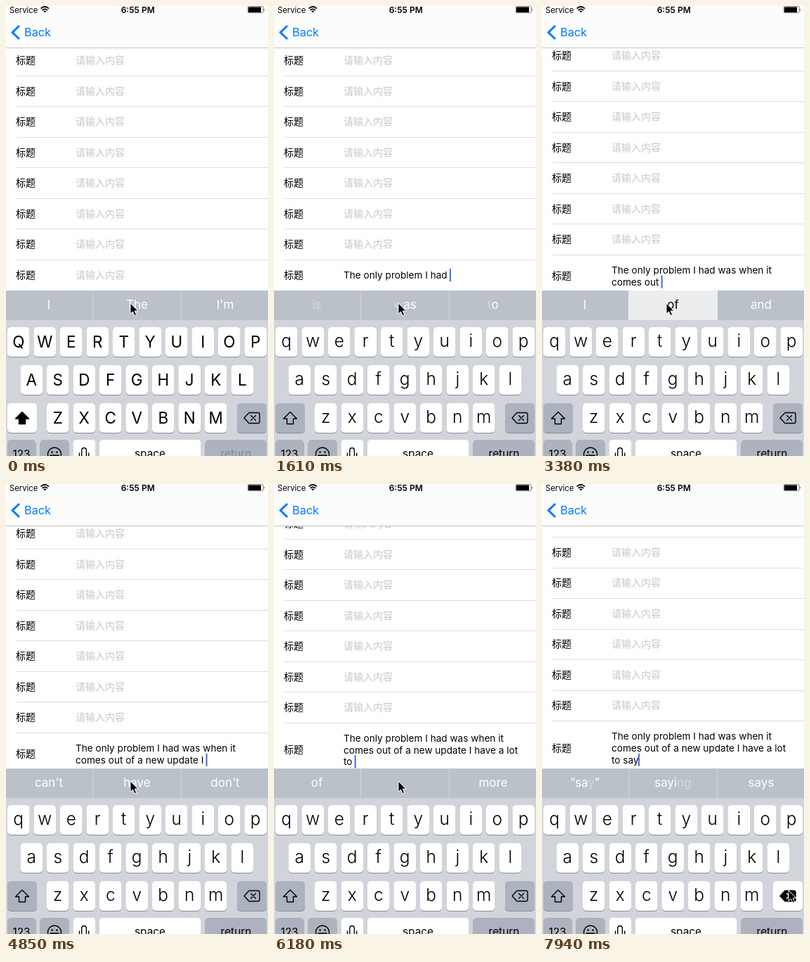
An HTML page that plays this animation: 373x639 px, repeating every 8000 ms.

```html
<!DOCTYPE html>
<html lang="zh-CN">
<head>
<meta charset="utf-8">
<style>
  html, body { margin: 0; width: 100%; height: 100%; overflow: hidden; background: #fff; }
  svg { display: block; width: 373px; height: 639px; }
  text { font-family: Inter, "Noto Sans CJK SC", sans-serif; white-space: pre; }
  .mid { text-anchor: middle; }
  .cell { font-size: 14px; }
  .typed { font-size: 13.6px; }
  .hint { fill: #c7c7cd; }
  .suggest { font-size: 17px; fill: #fff; }
  .upper { font-size: 22.5px; }
  .lower { font-size: 24.5px; font-weight: 300; }
  .small { font-size: 15.4px; }
  .icon { fill: none; stroke: #000; stroke-width: 1.4; stroke-linejoin: round; stroke-linecap: round; }
</style>
</head>
<body>
<svg viewBox="0 0 373 639">
  <rect width="373" height="639" fill="#fff"/>
  <g id="rows"></g>
  <g id="nav">
    <rect width="373" height="59" fill="#fcfcfc"/>
    <rect y="59" width="373" height="1" fill="#c4c4c6"/>
    <text x="5" y="9.5" font-size="11.3">Service</text>
    <g fill="none" stroke="#000" stroke-width="1.7">
      <path d="M49.5 3.6Q55.3 -1.6 61 3.6M51.6 6Q55.3 2.6 59 6"/>
      <path d="M53.3 7.4Q55.3 5.8 57.3 7.4L55.3 9.4Z" fill="#000" stroke="none"/>
    </g>
    <text class="mid" x="187.7" y="9.5" font-size="12" font-weight="600">6:55 PM</text>
    <rect x="344.2" y="0.7" width="22" height="9" rx="1.5" fill="#fff" stroke="#000" stroke-width=".5"/>
    <rect x="345" y="1.5" width="18" height="7.5" rx=".5"/>
    <path d="M367 3.4q1.6 1.8 0 3.6z"/>
    <path d="M19 28L9.2 37.5L19 47" fill="none" stroke="#007aff" stroke-width="3"/>
    <text x="26" y="43" font-size="16.3" fill="#007aff">Back</text>
  </g>
  <rect y="404" width="373" height="42" fill="#bac1c9"/>
  <path d="M123.5 404V446M249.5 404V446" stroke="#d0d5da"/>
  <g id="bar"></g>
  <rect y="446" width="373" height="193" fill="#d1d4da"/>
  <g id="keys"></g>
  <path id="mouse" d="M0 0V15.2L3.5 12L6 17.6L8.6 16.5L6.2 11H11Z" stroke="#fff" stroke-width="1"/>
</svg>
<script>
const LOOP = 8000, STEP = 147.1, PITCH = 43.5, LINE = 16.7;
const GRAY = '#adb3be', WHITE = '#fff';
const $ = id => document.getElementById(id);

// [step, word entered, left, middle, right, late middle]; ~ marks a letter that fades in last
const entries = [
  [0, '', 'I', 'The', "I'm"],
  [2, 'The', '~first', '~only', '~same'],
  [4, 'only', '~thing', '~problem', '~one'],
  [6, 'problem', '~is', '~I', '~with'],
  [8, 'I', '~have', '~had', '~can'],
  [11, 'had', '~i~s', '~was', '~to'],
  [13, 'was', '~that', '~when', '~the'],
  [15, 'when', '~I', '~it', '~the'],
  [16, 'it', '~is', '~comes', '~was'],
  [18, 'comes', 'was', '', 'came', 'out'],
  [21, 'out', 'I', 'of', 'and'],
  [24, 'of', '~the', '~a', '~my'],
  [26, 'a', '~lot', '~new', '~game'],
  [28, 'new', '~one', '~update', '~game'],
  [30, 'update', '~is', '~I', '~and'],
  [32, 'I', "~can't", '~have', "~don't"],
  [35, 'have', '~to', '~a', '~been'],
  [37, 'a', '~great', '~lot', '~good'],
  [39, 'lot', '~of', '~to', '~more'],
  [41, 'to', 'of', '', 'more', 'say'],
  [44, 'say', '~that', '~about', '~the'],
  [54, null, '“sa~y”', 'sayi~n~g', 'says']
];

const mousePath = [[0, 177, 422], [44, 177, 422], [46, 235, 480], [48, 345, 576],
  [49, 352, 606], [51, 351, 577], [55, 351, 577]];

const text = (x, y, s, cls, extra = '') => `<text x="${x}" y="${y}" class="${cls}" ${extra}>${s}</text>`;
const key = (x, y, w, fill = WHITE) =>
  `<rect x="${x}" y="${y + 1}" width="${w}" height="42" rx="5" fill="#898c92"/>` +
  `<rect x="${x}" y="${y}" width="${w}" height="42" rx="5" fill="${fill}"/>`;

function letterKeys(upper) {
  return [['QWERTYUIOP', 2, 456], ['ASDFGHJKL', 20.5, 510], ['ZXCVBNM', 58, 564]].map(([row, x0, y]) =>
    [...row].map((c, i) => {
      const x = x0 + i * 37.5;
      return key(x, y, 31.5) + text(x + 15.75, y + (upper ? 29 : 28), upper ? c : c.toLowerCase(),
        upper ? 'mid upper' : 'mid lower');
    }).join('')).join('');
}

function keyboard(upper, deleting) {
  const on = flag => flag ? WHITE : GRAY;
  return letterKeys(upper) +
    key(2, 564, 42, on(upper)) +
    `<path class="icon" d="M23 576.5L32.5 586H27.5V593.5H18.5V586H13.5Z" ${upper ? 'style="fill:#000"' : ''}/>` +
    key(329, 564, 42, on(deleting)) +
    `<path class="icon" d="M346 577.5H358.5Q361 577.5 361 580V590Q361 592.5 358.5 592.5H346L339 585Z" ${deleting ? 'style="fill:#000"' : ''}/>` +
    `<path class="icon" d="M348.5 581.5L355.5 588.5M355.5 581.5L348.5 588.5" ${deleting ? 'style="stroke:#fff"' : ''}/>` +
    key(2, 616, 40.5, GRAY) + text(22, 642, '123', 'mid small') +
    key(48.5, 616, 41, GRAY) +
    '<circle class="icon" cx="69" cy="636.5" r="9.5"/><circle cx="65.5" cy="633.5" r="1.3"/><circle cx="72.5" cy="633.5" r="1.3"/>' +
    '<path class="icon" d="M63 638Q69 646 75 638Z"/>' +
    key(95.5, 616, 32) +
    '<rect class="icon" x="107.8" y="627.5" width="6.6" height="14" rx="3.3"/><path class="icon" d="M104.5 635V639M117.7 635V639"/>' +
    key(133, 616, 144.5) + text(205, 641, 'space', 'mid small') +
    key(283.5, 616, 87.5, GRAY) + text(327.5, 641, 'return', 'mid small', upper ? 'fill="#848a94"' : '');
}

function suggestion(x, word, fresh, pressed) {
  const letters = word.replace(/~(.)/g, fresh ? '<tspan fill-opacity=".38">$1</tspan>' : '$1');
  return text(x, 429.5, letters, 'mid suggest', pressed ? 'style="fill:#000"' : '');
}

function drawBar(index, step) {
  const [start, , left, middle, right, late] = entries[index];
  const next = entries[index + 1];
  const pressed = next && next[1] && step === next[0] - 1 && step > start;
  const fresh = step === start && step > 0;
  $('bar').innerHTML =
    (pressed ? '<rect x="123" y="404" width="127" height="42" fill="#ebedef"/>' : '') +
    suggestion(61, left, fresh) +
    suggestion(186.5, pressed && late ? late : middle, fresh, pressed) +
    suggestion(312, right, fresh);
}

function typedLines(index) {
  const words = entries.slice(1, index + 1).map(e => e[1]).filter(Boolean);
  const lines = [words.slice(0, 8), words.slice(8, 18), words.slice(18)]
    .filter(l => l.length).map(l => l.join(' ') + ' ');
  if (entries[index][1] === null) lines.push(lines.pop().trimEnd());
  return lines;
}

const smooth = p => { p = Math.min(1, Math.max(0, p)); return p * p * (3 - 2 * p); };
const scrollAt = t => 7 * smooth((t - 2570) / 300) + LINE * smooth((t - 5953) / 300);

function drawRows(index, step) {
  const lines = typedLines(index);
  const label = y => text(14, y, '标题', 'cell');
  const hint = y => text(99, y, '请输入内容', 'cell hint');
  let out = '';
  for (let i = 0; i < 7; i++) {
    const y = 82.2 + i * PITCH;
    out += label(y) + hint(y) +
      `<rect x="15" y="${98.8 + i * PITCH}" width="358" height="1" fill="#dedee1" shape-rendering="crispEdges"/>`;
  }
  const y = 82.2 + 7 * PITCH;
  out += label(y + Math.max(0, lines.length - 1) * LINE / 2);
  out += lines.length ? lines.map((s, i) => text(99, y + .3 + i * LINE, s, 'typed')).join('') : hint(y);
  const rows = $('rows');
  rows.innerHTML = out;
  rows.setAttribute('transform', `translate(0 ${-scrollAt(step * STEP)})`);

  const blinkOff = step > 47 && step < 52 && step % 4 < 2;
  if (lines.length && !blinkOff) {
    const last = rows.lastElementChild;
    const x = 99 + last.getComputedTextLength();
    const top = +last.getAttribute('y') - 14;
    last.insertAdjacentHTML('afterend', `<rect x="${x - .6}" y="${top}" width="2" height="18" fill="#426bf2"/>`);
  }
}

function moveMouse(step) {
  const i = mousePath.findIndex(p => p[0] > step);
  const [a, b] = [mousePath[i - 1], mousePath[i]];
  const p = (step - a[0]) / (b[0] - a[0]);
  const mix = k => a[k] + (b[k] - a[k]) * p;
  $('mouse').setAttribute('transform', `translate(${mix(1)} ${mix(2)})`);
}

let shown = -1;
function tick() {
  const step = Math.min(54, Math.floor((performance.now() % LOOP + 9) / STEP));
  if (step !== shown) {
    shown = step;
    const index = entries.filter(e => e[0] <= step).length - 1;
    drawRows(index, step);
    drawBar(index, step);
    $('keys').innerHTML = keyboard(index === 0, step >= 53);
    moveMouse(step);
  }
  requestAnimationFrame(tick);
}
tick();
</script>
</body>
</html>
```
